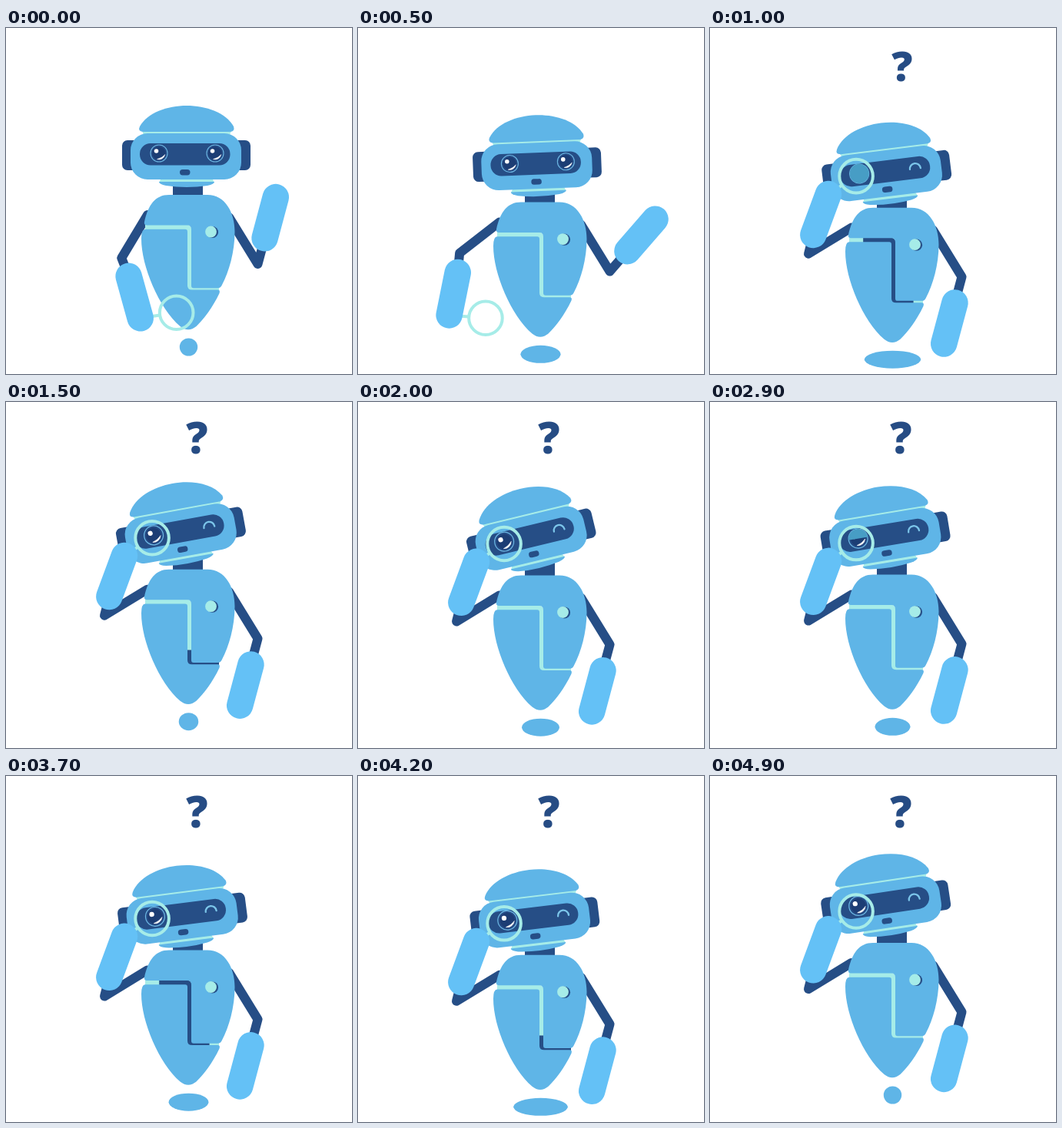
Animation, 450 px wide and 450 px high, one loop 5000 ms. Source, as an HTML page:

```html
<!DOCTYPE html>
<html lang="en">
<head>
<meta charset="utf-8">
<title>Curious robot</title>
<style>
  html, body { margin: 0; width: 100%; height: 100%; overflow: hidden; background: #fff; }
  svg { display: block; width: 100vw; height: 100vh; }
  .body { fill: #5fb5e7; }
  .navy { fill: #264e86; }
  .mint { fill: #a6ece8; }
  .limb { fill: none; stroke: #264e86; stroke-width: 12; stroke-linecap: round; stroke-linejoin: round; }
  .forearm { stroke: #64c1f6; stroke-width: 34.5; stroke-linecap: round; }
  .seam { fill: none; stroke-width: 7; }
  .ring { fill: none; stroke: #a6ece8; stroke-width: 4; }
  .mark { font: 800 56px "Open Sans", "Noto Sans", sans-serif; fill: #264c84; text-anchor: middle; }
</style>
</head>
<body>
<svg viewBox="0 0 450 450">
  <defs>
    <g id="eye">
      <circle r="11" fill="#254b85" stroke="#6db8e4" stroke-width="1.1"/>
      <circle r="8.6" fill="#1c3d74"/>
      <path d="M-2.5 7.6A8 8 0 0 0 7.8 1.6Q4 6-2.5 7.6Z" fill="#fff" stroke="#fff" stroke-width=".5"/>
      <circle cx="-3.5" cy="-3" r="2.8" fill="#fff"/>
    </g>
    <path id="seamPath" pathLength="177"
      d="M181 259H233Q238.500 259 238.500 264V334Q238.500 339.400 244 339.400H277"/>
    <clipPath id="lidClip"><rect id="lidRect" x="-13" y="-12" width="26" height="0"/></clipPath>
  </defs>

  <ellipse id="shadow" class="body" cx="237.5" ry="11.5"/>

  <g id="torso">
    <path id="limbL" class="limb"/>
    <path id="limbR" class="limb"/>
    <rect class="navy" x="217" y="192" width="39" height="34"/>
    <use class="seam" href="#seamPath" stroke="#a6ece8"/>
    <use id="pulse" class="seam" href="#seamPath" stroke="#264e86"/>
    <path class="body" d="M183 256.500Q179 256 180 252C185 230 194 217 212 217H262C285 217 297.500 240 297.500 265C297.500 291 290 317 281 334Q279.500 338.200 275 338.200H244Q241 338.200 241 335V262Q241 256.500 236 256.500Z"/>
    <path class="body" d="M181 261.700H233Q236 261.700 236 265V335Q236 340.600 242 340.600H275Q279 340.600 277.500 345C269 363 257 379 247.500 388Q237 396.500 226.500 388C199 364 176 310 176 274Q176 261.700 181 261.700Z"/>
    <circle class="navy" cx="268.5" cy="265.5" r="7.6"/>
    <circle class="mint" cx="266.5" cy="265" r="7.4"/>
  </g>

  <g id="head">
    <rect class="navy" x="151" y="146" width="24" height="39" rx="7"/>
    <rect class="navy" x="294" y="146" width="24" height="39" rx="7"/>
    <path class="mint" d="M177 134H293L291 139H179ZM202 195H268L271 201H199Z"/>
    <path class="body" d="M178 135Q171 134 174 128C184 110 210 101 235 101C260 101 286 110 296 128Q298 134 292 135Z"/>
    <path class="body" d="M199 200H271Q271 203 262 205Q235 209 208 205Q199 203 199 200Z"/>
    <rect class="body" x="162" y="137" width="144" height="60" rx="22"/>
    <rect class="navy" x="174" y="150" width="117.5" height="28.5" rx="14"/>
    <rect class="navy" x="226" y="184" width="13.5" height="7.500" rx="3.700"/>
    <g id="eyeL">
      <use href="#eye"/>
      <circle r="11" fill="#479dc5" clip-path="url(#lidClip)"/>
    </g>
    <use id="eyeR" href="#eye" transform="translate(272 163)"/>
    <path id="wink" d="M265 165.500A7 7 0 0 1 279 165.500" fill="none" stroke="#7cc6ea" stroke-width="2.3" stroke-linecap="round"/>
  </g>

  <g id="front">
    <line id="handle" stroke="#a6ece8" stroke-width="4"/>
    <circle id="lens" class="ring" r="21.800"/>
    <line id="armL" class="forearm"/>
    <line id="armR" class="forearm"/>
  </g>

  <text id="mark" class="mark">?</text>
</svg>
<script>
const LOOP = 5000;
const el = {};
document.querySelectorAll('[id]').forEach(n => el[n.id] = n);

const set = (node, attrs) => {
  for (const k in attrs) node.setAttribute(k, attrs[k]);
};
const clamp = x => Math.max(0, Math.min(1, x));
const ease = x => x * x * (3 - 2 * x);

// Eased value from [time, value] keys
function key(t, keys) {
  if (t <= keys[0][0]) return keys[0][1];
  for (let i = 1; i < keys.length; i++) {
    const [t0, v0] = keys[i - 1], [t1, v1] = keys[i];
    if (t <= t1) return v0 + (v1 - v0) * ease((t - t0) / (t1 - t0));
  }
  return keys[keys.length - 1][1];
}

const polar = ([x, y], deg, len) => {
  const a = deg * Math.PI / 180;
  return [x + Math.cos(a) * len, y + Math.sin(a) * len];
};
const setLine = (node, [x1, y1], [x2, y2]) => set(node, { x1, y1, x2, y2 });
const poly = pts => 'M' + pts.map(p => p.join(' ')).join('L');

const LOW = 17.2;
const BOB = [[0, 0], [930, LOW], [1580, 0], [2430, LOW], [3300, 0], [4050, LOW], [4900, 0]];
const TILT = [[0, 0], [300, -1], [1000, -7], [2000, -13.6], [2900, -9.4], [3700, -7.3], [4200, -6.8], [5000, -8.6]];
const NOD = [[0, 0], [1000, 5], [1650, 2], [2000, .3], [2900, .5], [3260, 4], [3600, 5.8], [3700, 5.3], [4200, 4.3], [4900, 0]];
const UPPER_L = [[0, 121], [600, 144], [1000, 148.7]];
const FORE_L = [[0, 74.5], [550, 102], [1000, -69.7]];
const LENS = [[0, -8.5], [550, 5], [1000, -32.8]];
const FORE_R = [[0, -75], [600, -47], [1000, 105]];
const LID = [[820, 0], [950, 1], [1030, 1], [1170, 0], [2800, 0], [2900, .5], [2980, 1], [3120, 0]];

function drawArms(t) {
  const shoulderL = [184, 243];
  const elbowL = polar(shoulderL, key(t, UPPER_L), 65.5);
  const angleL = key(t, FORE_L);
  const baseL = polar(elbowL, angleL - 6, 25.5);
  const handL = polar(baseL, angleL, 56.500);
  set(el.limbL, { d: poly([shoulderL, elbowL, baseL]) });
  setLine(el.armL, baseL, handL);

  const lensAngle = key(t, LENS);
  const [cx, cy] = polar(handL, lensAngle, key(t, [[600, 47.5], [1000, 43]]));
  set(el.lens, { cx, cy });
  setLine(el.handle, handL, polar([cx, cy], lensAngle, -22));

  const elbowR = [327.5, 307];
  const angleR = key(t, FORE_R);
  const baseR = polar(elbowR, angleR, 35);
  set(el.limbR, { d: poly([[290, 246], elbowR, baseR]) });
  setLine(el.armR, baseR, polar(elbowR, angleR, 90));
}

// A dark stretch runs along the chest seam twice per loop
function drawPulse(t) {
  const u = t < 2500 ? t + 2700 : t;
  const from = 177 * clamp((u - 3610) / 860);
  const to = 177 * clamp((u - 3200) / 540);
  set(el.pulse, {
    'stroke-dasharray': `0 ${from} ${to - from} 400`,
    visibility: to - from > .5 ? 'visible' : 'hidden'
  });
}

function drawFace(t) {
  const scale = key(t, [[650, 1], [950, 1.13]]);
  set(el.eyeL, { transform: `translate(199 163) scale(${scale})` });
  set(el.lidRect, { height: 24 * key(t, LID) });
  const winking = t >= 750;
  set(el.eyeR, { visibility: winking ? 'hidden' : 'visible' });
  set(el.wink, { visibility: winking ? 'visible' : 'hidden' });
}

function draw(t) {
  const bob = key(t, BOB);
  const move = `translate(0 ${bob})`;
  set(el.torso, { transform: move });
  set(el.front, { transform: move });
  set(el.shadow, { cy: 415 + bob * .97, rx: 11.7 + bob * 1.5 });
  set(el.head, { transform: `translate(0 ${bob + key(t, NOD)}) rotate(${key(t, TILT)} 236 205)` });
  drawArms(t);
  drawPulse(t);
  drawFace(t);

  const rise = key(t, [[750, 1], [1150, 0]]);
  set(el.mark, {
    transform: `translate(${248.5 + 4.5 * rise} ${66.5 + 7 * rise}) scale(${1 - .12 * rise})`,
    opacity: clamp((t - 750) / 170)
  });
}

const start = performance.now();
function tick() {
  draw((performance.now() - start) % LOOP);
  requestAnimationFrame(tick);
}
draw(0);
requestAnimationFrame(tick);
</script>
</body>
</html>
```
